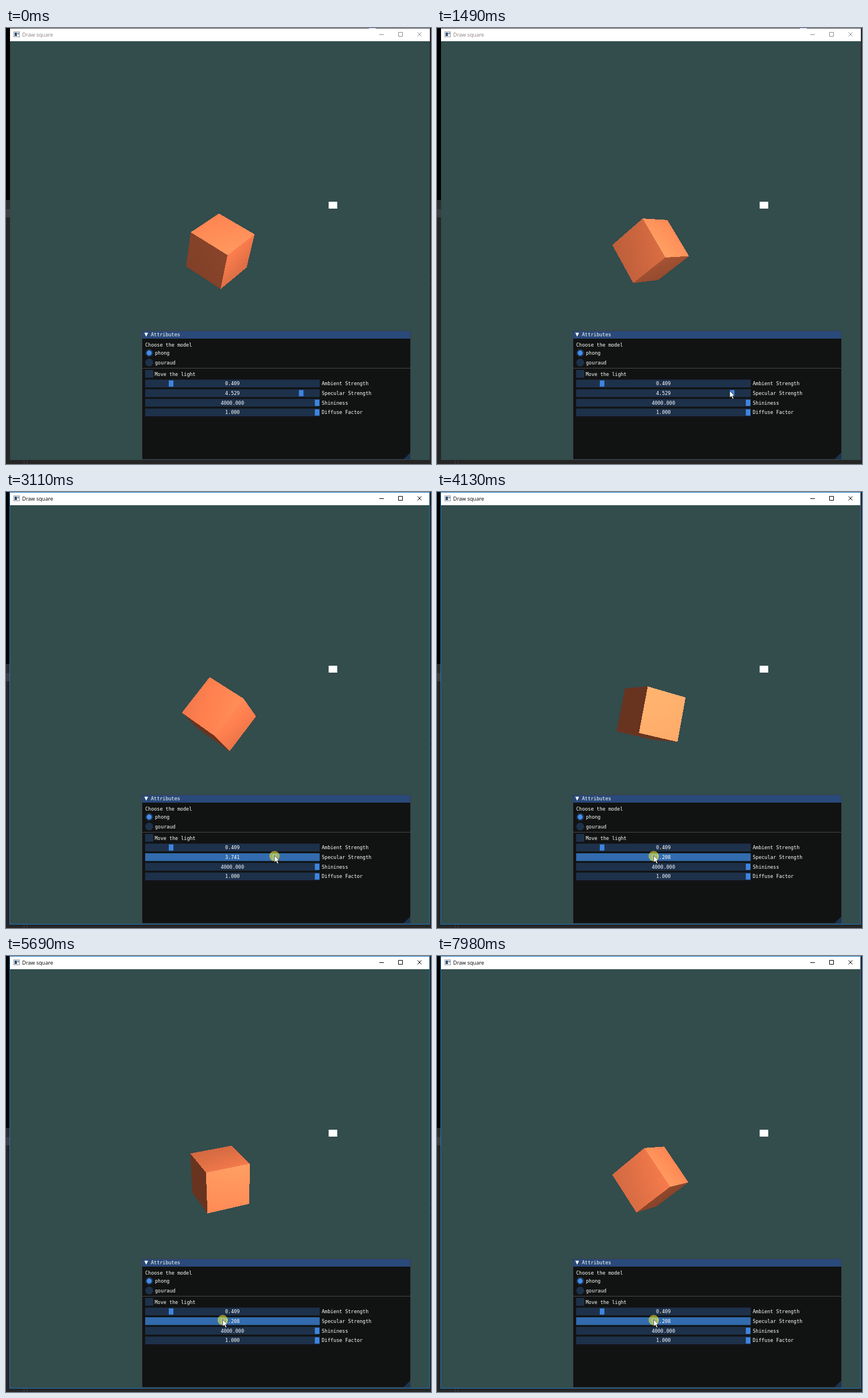
An HTML page with a canvas for the animation above (8000 ms loop, 739 px wide and 758 px high).

```html
<!DOCTYPE html>
<html lang="en">
<head>
<meta charset="utf-8">
<title>Draw square</title>
<style>
  html, body { margin: 0; width: 100%; height: 100%; overflow: hidden; background: #252526; }
  svg { position: absolute; left: 0; top: 0; display: block; }
  canvas { position: absolute; left: 300px; top: 315px; }
  .mono { font: 8.45px "DejaVu Sans Mono", "Noto Sans Mono", monospace; fill: #fff; white-space: pre; }
  .caption { font: 9.1px "Open Sans", "Noto Sans", sans-serif; }
</style>
</head>
<body>
<svg width="739" height="758" viewBox="0 0 739 758">
  <rect width="739" height="758" fill="#252526"/>
  <rect width="7" height="299" fill="#000"/>
  <rect y="299" width="7" height="16" fill="#2d2d30"/>
  <rect y="315" width="7" height="14" fill="#3e3e42"/>
  <path d="M31.5 752V758M36.5 752V758M737 430.5H739M737 445.5H739" stroke="#3c3c40"/>
  <rect x="7" width="730" height="751" fill="#334c4c"/>
  <rect x="7" width="730" height="23" fill="#fff"/>
  <path d="M7 .5H737" stroke="#4a4a4a"/>
  <path d="M631 .5H643" stroke="#c9c9ee"/>
  <rect id="border" x="6.5" y=".5" width="730" height="751" fill="none"/>
  <g>
    <rect x="13.5" y="6.5" width="10" height="9" fill="#edf0f3" stroke="#9aa2aa"/>
    <rect x="15" y="8" width="4" height="6" fill="#34506f"/>
    <rect x="20" y="8" width="2.5" height="3" fill="#7c93a8"/>
  </g>
  <text id="caption" class="caption" x="28" y="15">Draw square</text>
  <path id="buttons" d="M649 11.5H657M682.5 7.5H689.5V14.5H682.5ZM715.5 7.5L722.5 14.5M722.5 7.5L715.5 14.5" fill="none"/>
  <rect x="561" y="302" width="15" height="12" fill="#fff"/>

  <rect x="236.5" y="526.5" width="467" height="223.5" rx="2" fill="#111313" stroke="#3c3f48"/>
  <rect x="237" y="527" width="466" height="13" fill="#294a7a"/>
  <path d="M240.5 529.7H247L243.75 536.7Z" fill="#fff"/>
  <path d="M237 591.5H703" stroke="#45474d"/>
  <path d="M703 738V750H691Z" fill="#1d3450"/>
  <circle cx="249" cy="565" r="6.8" fill="#1e314b"/>
  <circle cx="249" cy="565" r="4.4" fill="#4290ee"/>
  <circle cx="249" cy="581.6" r="6.8" fill="#1e314b"/>
  <rect x="242" y="594.5" width="14" height="13.5" fill="#1e314b"/>
  <g id="panel"></g>
  <circle id="halo" cy="633" r="9" fill="#e8e337" fill-opacity=".6"/>
  <path id="cursor" d="M0 0V12L2.8 9.4 4.9 14.2 6.9 13.3 4.9 8.7H8.4Z" fill="#fff" stroke="#000" stroke-width=".6"/>
</svg>
<canvas id="cube" width="144" height="144"></canvas>

<script>
const LOOP = 8000;
const $ = id => document.getElementById(id);

function add(tag, attrs, text) {
  const el = document.createElementNS("http://www.w3.org/2000/svg", tag);
  for (const k in attrs) el.setAttribute(k, attrs[k]);
  if (text) el.textContent = text;
  $("panel").append(el);
  return el;
}
const label = (x, y, text, anchor = "start") =>
  add("text", { class: "mono", x, y, "text-anchor": anchor }, text);

// Panel
const KNOB_MIN = 247, KNOB_SPAN = 294;
const knobX = part => KNOB_MIN + part * KNOB_SPAN;

function slider(row, name, value, max) {
  const y = 611.3 + row * 16.75;
  const bar = add("rect", { x: 242, y, width: 303.5, height: 13.5 });
  const knob = add("rect", { y: y + 1.4, width: 8, height: 10.8 });
  const number = label(393.7, y + 9.7, "", "middle");
  label(549, y + 9.7, name);
  const set = (v, active) => {
    bar.setAttribute("fill", active ? "#326bae" : "#1e314b");
    knob.setAttribute("fill", active ? "#4296fa" : "#3d85e0");
    knob.setAttribute("x", knobX(v / max) - 4);
    number.textContent = v.toFixed(3);
  };
  set(value, false);
  return set;
}
label(252, 536, "Attributes");
label(242, 553.5, "Choose the model");
label(259, 568.2, "phong");
label(259, 585, "gouraud");
label(258.5, 604.7, "Move the light");
slider(0, "Ambient Strength", 0.409, 3);
const setSpecular = slider(1, "Specular Strength", 4.529, 5);
slider(2, "Shininess", 4000, 4000);
slider(3, "Diffuse Factor", 1, 1);

// Cube: turns one radian per second about a fixed axis
const cross = (a, b) => [a[1] * b[2] - a[2] * b[1], a[2] * b[0] - a[0] * b[2], a[0] * b[1] - a[1] * b[0]];
const dot = (a, b) => a[0] * b[0] + a[1] * b[1] + a[2] * b[2];
const mix = (a, p, b, q) => a.map((v, i) => v * p + b[i] * q);
const unit = a => { const n = Math.hypot(...a); return a.map(v => v / n); };

const AXIS = unit([0.399, 0.872, 0.284]);
const SIDE = unit([0.778, -0.483, 0.402]);
const TURN = cross(AXIS, SIDE);
const EYE = [0, 0, 11.3], FOCAL = 880, CX = 371.7, CY = 387;
const LIGHT = [1.74, 0.70, 3.5];
const AMBIENT = 0.409, SHININESS = 4000;
const COLOR = [255, 127.5, 79];

const ctx = $("cube").getContext("2d");
const SIZE = 144, LEFT = 300, TOP = 315;
const image = ctx.createImageData(SIZE, SIZE);

function axesAt(angle) {
  const e3 = mix(SIDE, Math.cos(angle), TURN, Math.sin(angle));
  const m = cross(e3, AXIS);
  const p = 1 / Math.sqrt(5), q = 2 * p;
  return [mix(AXIS, p, m, -q), mix(AXIS, q, m, p), e3];
}

function shade(hit, normal, strength) {
  const toLight = unit(mix(LIGHT, 1, hit, -1));
  const facing = dot(normal, toLight);
  if (facing <= 0) return AMBIENT;
  const mirror = mix(normal, 2 * facing, toLight, -1);
  const glint = Math.max(0, dot(mirror, unit(mix(EYE, 1, hit, -1))));
  return AMBIENT + facing + strength * Math.pow(glint, SHININESS);
}

function drawCube(angle, strength) {
  const axes = axesAt(angle);
  const origin = axes.map(a => dot(a, EYE));
  image.data.fill(0);
  for (let y = 0; y < SIZE; y++) for (let x = 0; x < SIZE; x++) {
    const ray = [(LEFT + x + 0.5 - CX) / FOCAL, (CY - TOP - y - 0.5) / FOCAL, -1];
    let near = -Infinity, far = Infinity, face = 0, sign = 1;
    for (let i = 0; i < 3; i++) {
      const d = dot(axes[i], ray) || 1e-9;
      const s = d > 0 ? -1 : 1;
      const enter = (s * 0.5 - origin[i]) / d;
      if (enter > near) { near = enter; face = i; sign = s; }
      far = Math.min(far, (-s * 0.5 - origin[i]) / d);
    }
    if (near > far) continue;
    const normal = axes[face].map(v => v * sign);
    const k = shade(mix(EYE, 1, ray, near), normal, strength);
    const o = (y * SIZE + x) * 4;
    COLOR.forEach((c, i) => { image.data[o + i] = Math.min(255, c * k); });
    image.data[o + 3] = 255;
  }
  ctx.putImageData(image, 0, 0);
}

const MARKS = [70, 920, 1790, 2640, 3510, 4360, 5220, 6080, 6890, 7750, 8600];
function snap(t) {
  if (t < MARKS[0]) return 0;
  const i = MARKS.findIndex(m => m > t) - 1;
  const step = (MARKS[i + 1] - MARKS[i]) / (MARKS[i] === 6080 ? 10 : 11);
  return MARKS[i] + Math.floor((t - MARKS[i]) / step + 1e-6) * step;
}

const ease = (t, a, b) => {
  const p = Math.min(1, Math.max(0, (t - a) / (b - a)));
  return p * p * (3 - 2 * p);
};
const PRESS = 1865, ENTER = 300;

function render(ms) {
  const t = snap(ms);
  const active = t >= PRESS;
  const drag = ease(t, 2600, 3720);
  const value = active ? 4.516 + (2.208 - 4.516) * drag : 4.529;

  const come = ease(t, ENTER - 100, 900), settle = ease(t, 960, 1600);
  const x = 660 - 182 * come + 34.5 * settle - 135.7 * drag;
  const y = 763 - 144 * come + 13 * settle;
  $("cursor").setAttribute("transform", `translate(${x.toFixed(2)} ${y.toFixed(2)})`);
  $("cursor").setAttribute("visibility", t >= ENTER ? "visible" : "hidden");
  $("halo").setAttribute("cx", x);
  $("halo").setAttribute("visibility", active ? "visible" : "hidden");

  setSpecular(value, active);
  $("caption").setAttribute("fill", active ? "#000" : "#8c8080");
  $("buttons").setAttribute("stroke", active ? "#000" : "#8c8c8c");
  $("border").setAttribute("stroke", active ? "#1c78bd" : "none");

  drawCube(0.012 + t * 0.0009987, value);
}

const start = performance.now();
function tick() {
  render((performance.now() - start) % LOOP);
  requestAnimationFrame(tick);
}
render(0);
requestAnimationFrame(tick);
</script>
</body>
</html>
```
